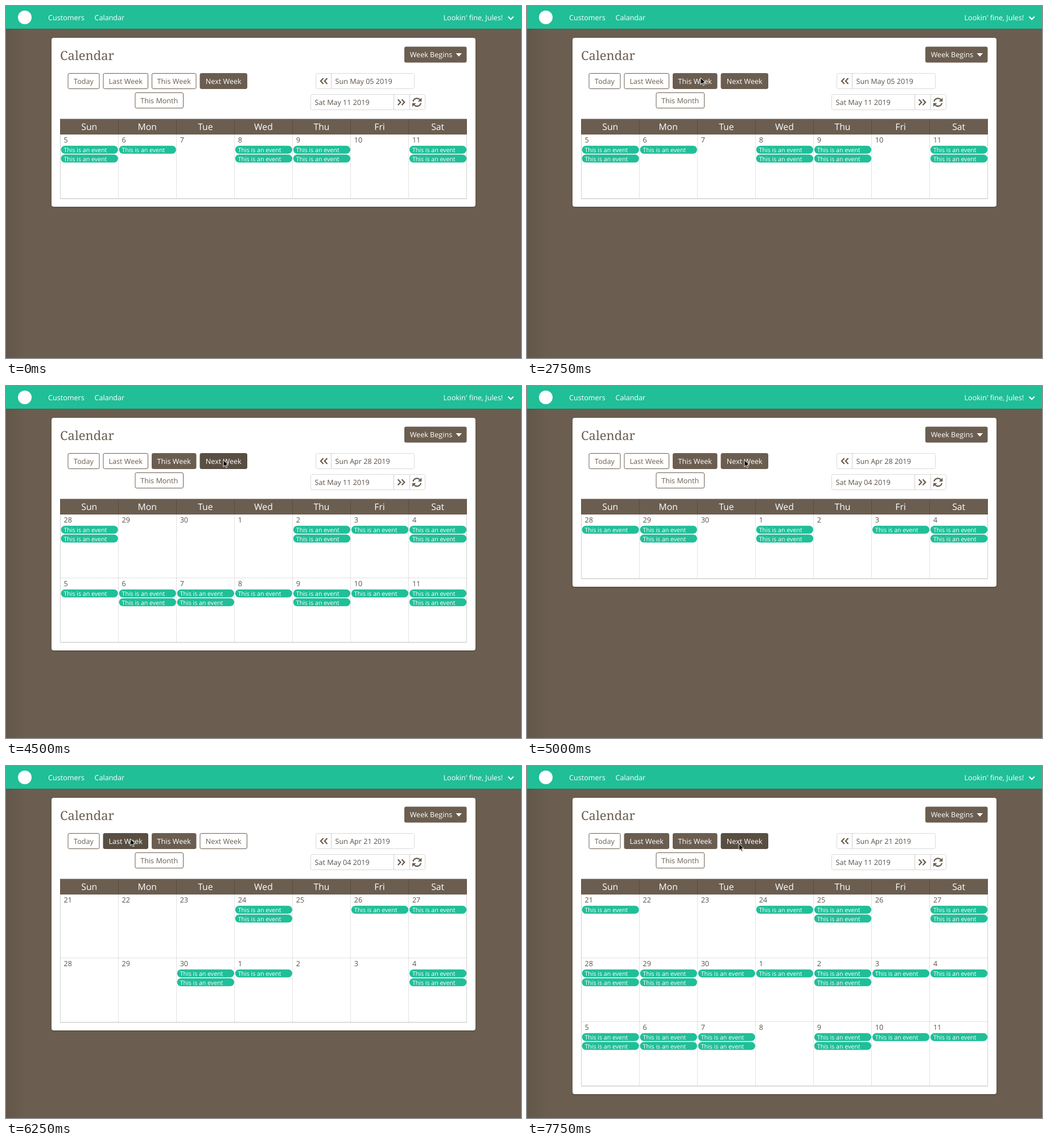
Animation of 905x619 px, one loop 8000 ms. Source, as an HTML page:

```html
<!DOCTYPE html>
<html lang="en">
<head>
<meta charset="utf-8">
<title>Calendar</title>
<style>
:root { --brown: #6b5e50; --dark: #594e42; --green: #20bf98; }
html, body { margin: 0; width: 100%; height: 100%; overflow: hidden; background: var(--brown); }
svg { display: block; width: 905px; height: 619px; }
text {
  font: 12.6px "Open Sans", "Noto Sans", sans-serif;
  text-rendering: geometricPrecision;
  white-space: pre;
  stroke: none;
}
.mid { text-anchor: middle; }
.white { fill: #fff; }
.title { font: 300 22px "Noto Serif", serif; fill: var(--brown); }
.head { font-size: 15.75px; fill: #fff; text-anchor: middle; }
.num, .date { fill: #5a5149; }
.event { font-size: 10.6px; fill: #fff; }
.pill { fill: var(--green); }
.field { fill: #fff; stroke: #d9d9d9; }
.rule { fill: none; stroke: #cfcfcf; }
.dash { stroke-dasharray: 1.5 1; }
.icon { fill: none; stroke: var(--brown); stroke-width: 2.3; }
.button { fill: #fff; stroke: var(--brown); color: var(--brown); }
.button text { fill: currentColor; text-anchor: middle; }
.view { opacity: 0; }
.card { fill: #fff; filter: drop-shadow(0 1px 1px rgba(0, 0, 0, .25)); }

.view, #last, #this, #next, #cursor { animation: 8s step-end infinite; }
#view0 { animation-name: view0; }
#view1 { animation-name: view1; }
#view2 { animation-name: view2; }
#view3 { animation-name: view3; }
#view4 { animation-name: view4; }
#last { animation-name: last; }
#this { animation-name: this; }
#next { animation-name: next; }
#cursor { animation-name: cursor; }

@keyframes view0 { 0% { opacity: 1 } 40.625%, to { opacity: 0 } }
@keyframes view1 { 0% { opacity: 0 } 40.625% { opacity: 1 } 62.5%, to { opacity: 0 } }
@keyframes view2 { 0% { opacity: 0 } 62.5% { opacity: 1 } 78.125%, to { opacity: 0 } }
@keyframes view3 { 0% { opacity: 0 } 78.125% { opacity: 1 } 96.875%, to { opacity: 0 } }
@keyframes view4 { 0% { opacity: 0 } 96.875%, to { opacity: 1 } }

@keyframes last {
  0% { fill: #fff; color: var(--brown); stroke: var(--brown) }
  71.875% { fill: var(--brown); color: #fff; stroke: var(--brown) }
  78.125% { fill: var(--dark); color: #fff; stroke: var(--dark) }
  81.25%, to { fill: var(--brown); color: #fff; stroke: var(--brown) }
}
@keyframes this {
  0% { fill: #fff; color: var(--brown); stroke: var(--brown) }
  34.375% { fill: var(--brown); color: #fff; stroke: var(--brown) }
  40.625% { fill: var(--dark); color: #fff; stroke: var(--dark) }
  56.25%, to { fill: var(--brown); color: #fff; stroke: var(--brown) }
}
@keyframes next {
  0% { fill: var(--brown); color: #fff; stroke: var(--brown) }
  56.25% { fill: var(--dark); color: #fff; stroke: var(--dark) }
  62.5% { fill: var(--brown); color: #fff; stroke: var(--brown) }
  71.875% { fill: #fff; color: var(--brown); stroke: var(--brown) }
  81.25% { fill: var(--brown); color: #fff; stroke: var(--brown) }
  96.875%, to { fill: var(--dark); color: #fff; stroke: var(--dark) }
}
@keyframes cursor {
  0% { transform: translate(-40px, -40px) }
  15.625% { transform: translate(335px, 18px) }
  18.75% { transform: translate(311px, 124px) }
  21.875% { transform: translate(303px, 141px) }
  25% { transform: translate(302.5px, 137.5px) }
  34.375% { transform: translate(305px, 126px) }
  53.125% { transform: translate(306px, 126px) }
  56.25% { transform: translate(382px, 130px) }
  71.875% { transform: translate(219px, 127px) }
  75% { transform: translate(218.5px, 128px) }
  81.25% { transform: translate(341px, 135.5px) }
  84.375% { transform: translate(370px, 137px) }
  87.5%, to { transform: translate(372.5px, 136.5px) }
}
</style>
</head>
<body>
<svg viewBox="0 0 905 619">
  <defs>
    <linearGradient id="edge">
      <stop stop-opacity=".08"/>
      <stop offset="1" stop-opacity="0"/>
    </linearGradient>
  </defs>
  <rect width="905" height="619" fill="#6b5e50"/>
  <rect y="40" width="36" height="579" fill="url(#edge)"/>

  <rect y="40" width="905" height="1" opacity=".1"/>
  <rect width="905" height="40" fill="#20bf98"/>
  <circle class="white" cx="33" cy="20" r="12"/>
  <g class="white">
    <text x="74" y="25">Customers</text>
    <text x="155.5" y="25">Calandar</text>
    <text x="768.5" y="25">Lookin' fine, Jules!</text>
  </g>
  <path d="M882.5 18.8l4.6 4.6 4.6-4.6" fill="none" stroke="#fff" stroke-width="2.2"/>

  <g id="views"></g>

  <text class="title" x="95" y="94.5">Calendar</text>
  <rect x="700" y="71.5" width="109.5" height="28" rx="3" fill="#6b5e50"/>
  <text class="white" x="709.7" y="90">Week Begins</text>
  <path class="white" d="M790.5 83h10.6l-5.3 6z"/>

  <g id="buttons"></g>

  <path class="icon" d="M557.7 127l-4.7 5 4.7 5M564.5 127l-4.7 5 4.7 5"/>
  <path class="icon" d="M688.7 164.3l4.7 5-4.7 5M695.5 164.3l4.7 5-4.7 5"/>
  <g transform="translate(722.2 169.3)">
    <g id="arrow">
      <path class="icon" d="M-6.8-1.3A6.9 6.9 0 0 1 5.2-4.5"/>
      <path d="M8.2-8v6.6H1.6z" fill="#6b5e50"/>
    </g>
    <use href="#arrow" transform="rotate(180)"/>
  </g>

  <path id="cursor" d="M0 0V12.2L2.8 9.6 4.7 13.7 6.6 12.9 4.8 8.8H8.6Z" stroke="#fff" stroke-width="1"/>
</svg>
<script>
const LEFT = 95.5, TOP = 226, COL = 102.07, ROW = 112;
const DAYS = ["Sun", "Mon", "Tue", "Wed", "Thu", "Fri", "Sat"];

// first: days counted from the start of April; rows: events per day
const VIEWS = [
  { first: 35, rows: ["2102202"] },
  { first: 28, rows: ["2000212", "1221212"] },
  { first: 28, rows: ["1202012"] },
  { first: 21, rows: ["0002011", "0021002"] },
  { first: 21, rows: ["1001202", "2211211", "2220211"] }
];

const text = (cls, x, y, s) => `<text class="${cls}" x="${x}" y="${y}">${s}</text>`;
const rect = (cls, x, y, w, h, r = 0) =>
  `<rect class="${cls}" x="${x}" y="${y}" width="${w}" height="${h}" rx="${r}"/>`;
const line = (cls, d) => `<path class="${cls}" d="${d}"/>`;
const dayOf = n => n > 30 ? n - 30 : n;
const dateOf = n =>
  `${n > 30 ? "May" : "Apr"} ${String(dayOf(n)).padStart(2, "0")} 2019`;

function cell(x, y, day, count) {
  let out = text("num", x + 6, y + 14, day);
  for (let i = 0; i < count; i++) {
    const top = y + 19.8 + i * 15.5;
    out += rect("pill", x + 1, top, 100.3, 14, 7) +
      text("event", x + 6, top + 11.2, "This is an event");
  }
  return out;
}

function view({ first, rows }, id) {
  const height = rows.length * ROW, bottom = TOP + height, right = LEFT + 7 * COL;
  let out = rect("card", 80, 56, 745, 185 + height, 4);

  out += rect("field", 544.5, 118.5, 173, 27, 3) + line("rule", "M571.5 119v26");
  out += rect("field", 535.5, 155.5, 201, 27, 3) + line("rule", "M681.5 156v26M709.5 156v26");
  out += text("date", 578.5, 136.6, "Sun " + dateOf(first));
  out += text("date", 542.5, 173.9, "Sat " + dateOf(first + rows.length * 7 - 1));

  out += `<rect x="95" y="198.5" width="715" height="27.5" fill="#6b5e50"/>`;
  out += line("rule", `M${LEFT} ${TOP}V${bottom + .5}H${right - .5}V${TOP}`);
  out += `<path d="M95 ${bottom + 1.5}H810" stroke="#000" opacity=".08"/>`;
  DAYS.forEach((name, i) => {
    const x = LEFT + i * COL;
    out += text("head", x + COL / 2 - .3, 218.2, name);
    if (i) {
      const edge = Math.floor(x - .5) + .5;
      out += `<path d="M${edge} 199V226" stroke="#594e42"/>`;
      out += line("rule dash", `M${edge} ${TOP}V${bottom}`);
    }
  });
  rows.forEach((row, r) => {
    const y = TOP + r * ROW;
    if (r) out += line("rule dash", `M${LEFT} ${y - .5}H${right}`);
    [...row].forEach((count, i) => {
      out += cell(LEFT + i * COL, y, dayOf(first + r * 7 + i), +count);
    });
  });
  return `<g class="view" id="view${id}">${out}</g>`;
}

const button = (id, x, y, w, label) =>
  `<g class="button" id="${id}">${rect("", x, y, w, 27, 2.5)}` +
  text("", x + w / 2, y + 18.1, label) + "</g>";

document.getElementById("views").innerHTML = VIEWS.map(view).join("");
document.getElementById("buttons").innerHTML =
  button("today", 109, 118.5, 55, "Today") +
  button("last", 171, 118.5, 78.5, "Last Week") +
  button("this", 256.5, 118.5, 77.5, "This Week") +
  button("next", 341, 118.5, 82.5, "Next Week") +
  button("month", 227, 152.5, 84.5, "This Month");
</script>
</body>
</html>
```
